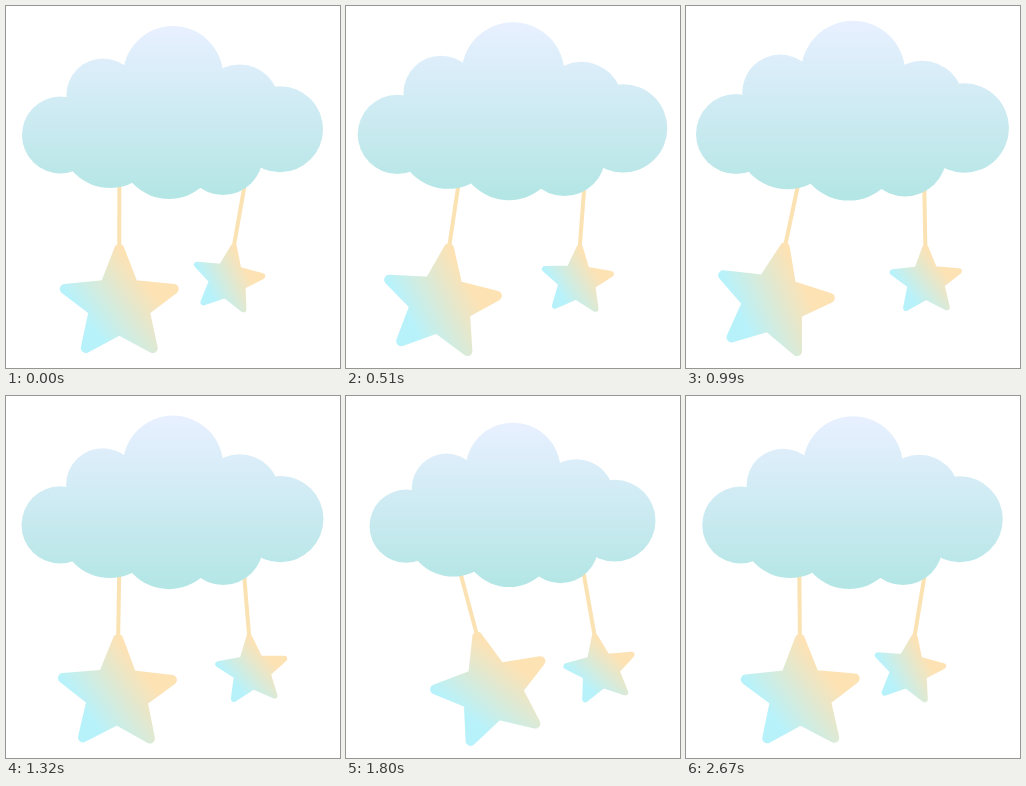
These frames come from a looping animation (334x362 px, 2700 ms). An HTML page:

```html
<!DOCTYPE html>
<html lang="en">
<head>
<meta charset="utf-8">
<title>Cloud mobile</title>
<style>
  html, body { margin: 0; width: 100%; height: 100%; overflow: hidden; background: #fff; }
  svg { display: block; width: 100%; height: 100%; }
</style>
</head>
<body>
<svg viewBox="0 0 334 362">
  <defs>
    <linearGradient id="sky" gradientUnits="userSpaceOnUse" x1="0" y1="20" x2="0" y2="186">
      <stop offset="0" stop-color="#e8f0ff"/>
      <stop offset="1" stop-color="#b5e6e6"/>
    </linearGradient>
    <linearGradient id="glow" gradientUnits="userSpaceOnUse" x1="-28" y1="83" x2="28" y2="41">
      <stop offset="0" stop-color="#b7f2fb"/>
      <stop offset="1" stop-color="#fde2b4"/>
    </linearGradient>
    <!-- Star hanging from its top tip at the origin -->
    <path id="star" d="M0 5L14 41L54.5 45L25.5 67L33.5 104L0 86L-33.5 104L-25.5 67L-54.5 45L-14 41Z"
      fill="url(#glow)" stroke="url(#glow)" stroke-width="10" stroke-linejoin="round"/>
  </defs>
  <g id="big">
    <path d="M0 0V68" stroke="#fbe2b3" stroke-width="4"/>
    <use href="#star" y="65"/>
  </g>
  <g id="small">
    <path d="M0 -6V60" stroke="#fbe2b3" stroke-width="4"/>
    <use href="#star" transform="translate(0 57.5) scale(.607)"/>
  </g>
  <g id="cloud" fill="url(#sky)">
    <circle cx="54.5" cy="129" r="38.5"/>
    <circle cx="97" cy="89" r="36.5"/>
    <circle cx="167" cy="70" r="50"/>
    <circle cx="233.5" cy="98.5" r="40"/>
    <circle cx="274" cy="123.2" r="43"/>
    <circle cx="104" cy="132" r="50"/>
    <circle cx="163" cy="143" r="50"/>
    <circle cx="217" cy="149" r="40"/>
  </g>
</svg>
<script>
  const LOOP = 2700;
  const [big, small, cloud] = ["big", "small", "cloud"].map(id => document.getElementById(id));

  // Linear interpolation through equally spaced keys, p in [0, 1)
  function through(keys, p) {
    const x = p * (keys.length - 1), i = Math.floor(x);
    return keys[i] + (keys[i + 1] - keys[i]) * (x - i);
  }

  function draw(now) {
    const p = (now % LOOP) / LOOP;
    const scale = through([1, 1.05, 0.95, 1], p);
    big.setAttribute("transform", `translate(113.3 173) rotate(${through([0, 15, -15, 0], p)})`);
    small.setAttribute("transform", `translate(238.3 181) rotate(${through([10, 0, -10, 10], p)})`);
    cloud.setAttribute("transform", `translate(166.7 153) scale(${scale}) translate(-166.7 -153)`);
  }

  function tick() {
    draw(performance.now());
    requestAnimationFrame(tick);
  }
  tick();
</script>
</body>
</html>
```
